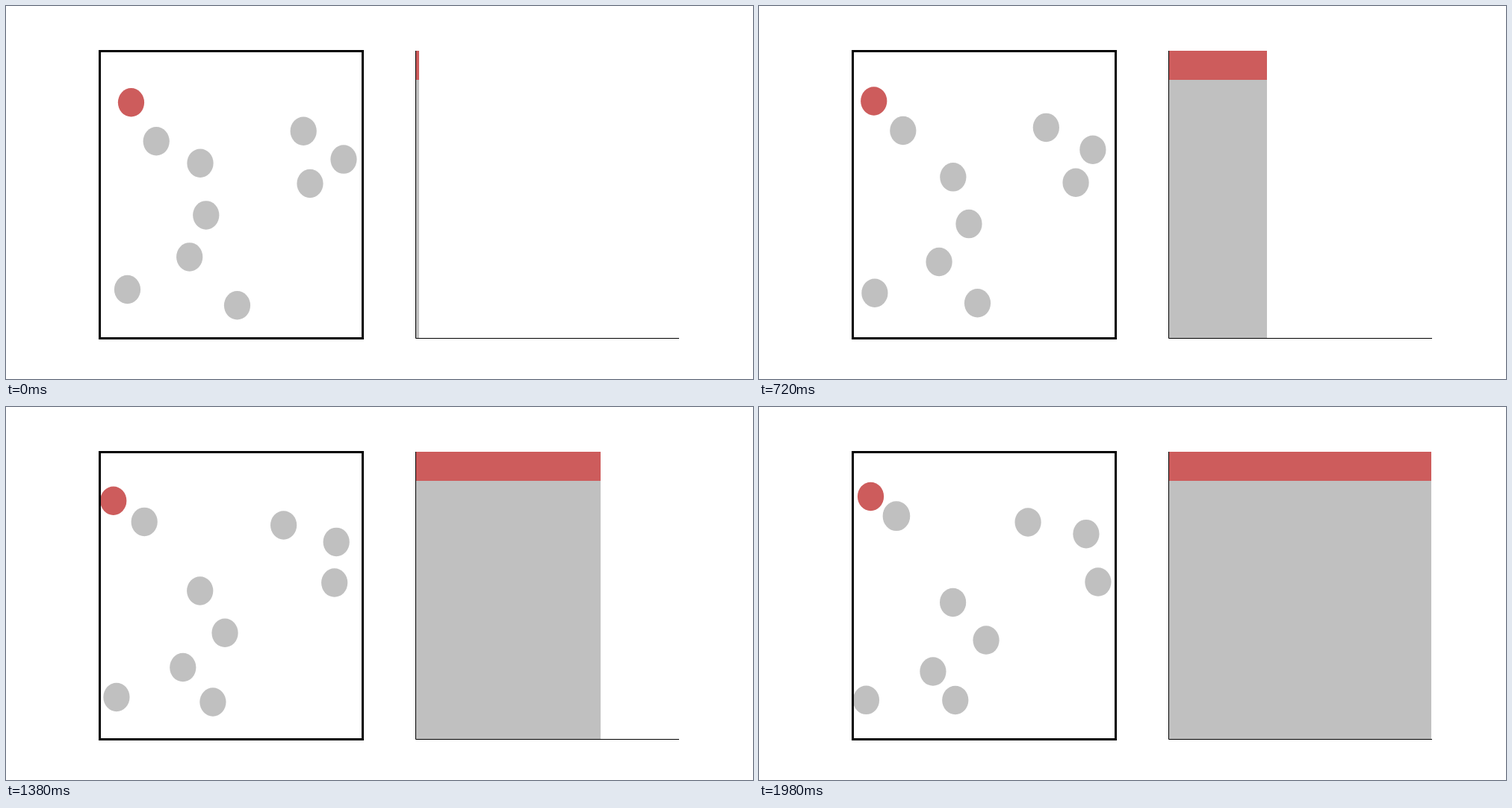
These frames come from a looping animation (1000 px wide and 500 px high, 2 s). An HTML page with a canvas:

```html
<!DOCTYPE html>
<html lang="en">
<head>
<meta charset="utf-8">
<title>Particles in a box</title>
<style>
  html, body { margin: 0; width: 100%; height: 100%; overflow: hidden; background: #fff; }
  canvas { display: block; width: 1000px; height: 500px; }
</style>
</head>
<body>
<canvas id="stage" width="1000" height="500"></canvas>
<script>
const ctx = document.getElementById('stage').getContext('2d');

const STEPS = 100, STEP_MS = 20;
const RED = '#cd5c5c', GRAY = '#c0c0c0';
const BOX = { x: 125, y: 60, w: 352.273, h: 385 };
const PLOT_X = 547.727;
const RADIUS = 0.05; // in box units, where the box is 1 by 1

// Starting point in pixels and the free drift over one loop.
function ball(x, y, driftX, driftY, color = GRAY) {
  return {
    x: (x - BOX.x) / BOX.w,
    y: (y - BOX.y) / BOX.h,
    vx: driftX / BOX.w / STEPS,
    vy: driftY / BOX.h / STEPS,
    color, outlined: false
  };
}

const start = [
  ball(167.5, 129.3, -38.2, -5.2, RED),
  ball(201.2, 181.3, -23.2, -39.7),
  ball(260, 210.7, -0.4, 51.8),
  ball(267.8, 280.4, 36.6, 32.5),
  ball(245.7, 336.4, -12.9, 18.3),
  ball(162.5, 380, -21.1, 13),
  ball(309.5, 401.3, -47.2, -8.4),
  ball(398.2, 167.7, -38.5, -13.4),
  ball(452, 205.6, -14.2, -35.8),
  ball(407, 238, 47.4, -3.5)
];

// Equal masses swap their velocities along the contact normal;
// a gray ball touched by a red one gains an outline.
function collide(a, b) {
  const dx = b.x - a.x, dy = b.y - a.y, dist = Math.hypot(dx, dy);
  if (dist >= 2 * RADIUS) return;
  const nx = dx / dist, ny = dy / dist;
  const push = (b.vx - a.vx) * nx + (b.vy - a.vy) * ny;
  if (push >= 0) return;
  a.vx += push * nx; a.vy += push * ny;
  b.vx -= push * nx; b.vy -= push * ny;
  if (a.color === RED) b.outlined = true;
}

function bounce(b, pos, vel) {
  const inside = Math.min(1 - RADIUS, Math.max(RADIUS, b[pos]));
  if (inside === b[pos]) return;
  b[vel] = Math.sign(inside - b[pos]) * Math.abs(b[vel]);
  b[pos] = inside;
}

function advance(balls) {
  const next = balls.map(b => ({ ...b, x: b.x + b.vx, y: b.y + b.vy }));
  next.forEach((a, i) => next.slice(i + 1).forEach(b => collide(a, b)));
  for (const b of next) {
    bounce(b, 'x', 'vx');
    bounce(b, 'y', 'vy');
  }
  return next;
}

const states = [start];
while (states.length < STEPS) states.push(advance(states.at(-1)));

function drawBall(b) {
  ctx.beginPath();
  ctx.ellipse(BOX.x + b.x * BOX.w, BOX.y + b.y * BOX.h,
    RADIUS * BOX.w, RADIUS * BOX.h, 0, 0, 2 * Math.PI);
  ctx.fillStyle = ctx.strokeStyle = b.color;
  ctx.fill();
  if (b.outlined) {
    ctx.lineWidth = 1.39;
    ctx.stroke();
  }
}

// Stacked shares of red and gray, one column per elapsed step.
function drawBars(balls, step) {
  const left = Math.round(PLOT_X);
  const edge = PLOT_X + (step + 1.5) / STEPS * BOX.w;
  const width = Math.round(Math.min(edge, PLOT_X + BOX.w)) - left;
  const share = balls.filter(b => b.color === RED).length / balls.length;
  const split = Math.round(BOX.y + share * BOX.h);
  ctx.fillStyle = RED;
  ctx.fillRect(left, BOX.y, width, split - BOX.y);
  ctx.fillStyle = GRAY;
  ctx.fillRect(left, split, width, BOX.y + BOX.h - split);
}

function drawLines() {
  const top = BOX.y + 0.5, bottom = top + BOX.h;
  ctx.strokeStyle = '#000';
  ctx.lineWidth = 3;
  ctx.strokeRect(BOX.x + 0.5, top, Math.round(BOX.w), BOX.h);
  ctx.lineWidth = 1;
  ctx.lineCap = 'square';
  ctx.beginPath();
  ctx.moveTo(548.5, top);
  ctx.lineTo(548.5, bottom);
  ctx.lineTo(900.5, bottom);
  ctx.stroke();
}

function draw(time) {
  const step = Math.floor(Math.max(0, time) / STEP_MS) % STEPS;
  const balls = states[step];
  ctx.fillStyle = '#fff';
  ctx.fillRect(0, 0, 1000, 500);
  balls.forEach(drawBall);
  drawBars(balls, step);
  drawLines();
}

function tick(now) {
  draw(now);
  requestAnimationFrame(tick);
}

draw(0);
requestAnimationFrame(tick);
</script>
</body>
</html>
```
